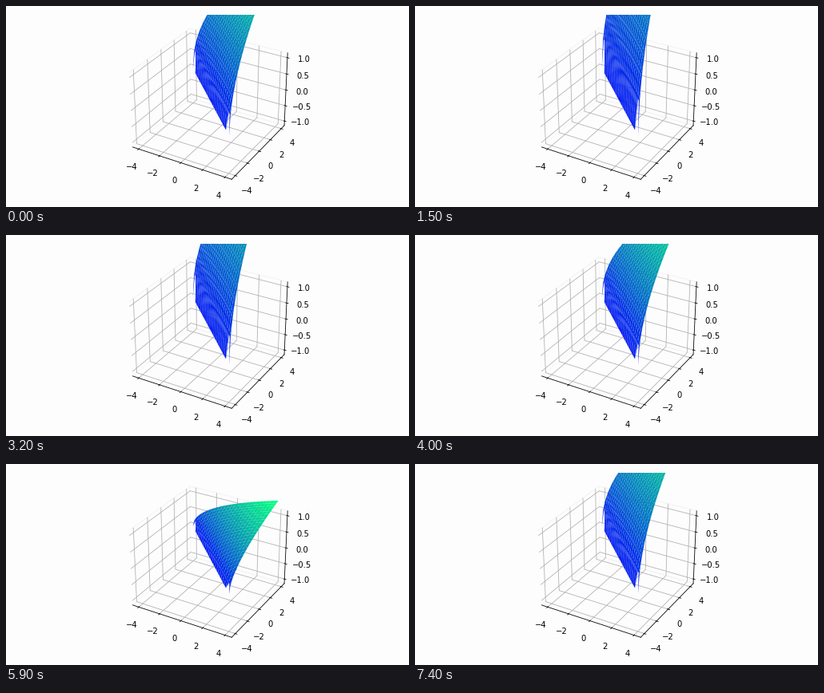
Write a matplotlib script that moves like this. It is 504 px wide and 252 px high and loops after 7500 ms.

```python
import numpy as np
import matplotlib.pyplot as plt
from matplotlib.animation import FuncAnimation

W, H, DPI = 504, 252, 72
FRAMES, INTERVAL = 75, 100
N = 50
BACK = "#fdfdfd"
MARGIN, SIDE = 10.8, 220.4

fig = plt.figure(figsize=(W / DPI, H / DPI), dpi=DPI, facecolor=BACK)
ax = fig.add_axes([0, (H - MARGIN - SIDE) / H, 1, SIDE / H], projection="3d")
ax.patch.set_visible(False)

pad = 25 / 24
ax.set_xlim(-4.4 * pad, 4.4 * pad)
ax.set_ylim(-4.4 * pad, 4.4 * pad)
ax.set_zlim(-1.1 * pad, 1.1 * pad)
ax.set_autoscale_on(False)
ax.tick_params(pad=4.7)
for axis in (ax.xaxis, ax.yaxis, ax.zaxis):
    axis.set_pane_color(BACK)
    axis.pane.set_edgecolor("#f3f3f3")

# Rounding leaves some diagonal sums just below zero, which notches the edge.
line = np.linspace(-4, 4, N + 1)
x, y = np.meshgrid(line, line)
with np.errstate(invalid="ignore"):
    root = np.sqrt(x + y)

surface = None


def draw(i):
    global surface
    if surface is not None:
        surface.remove()
    gain = 1.5 + np.sin(2 * np.pi * i / FRAMES)
    surface = ax.plot_surface(x, y, gain * root, cmap="winter")
    return [surface]


anim = FuncAnimation(fig, draw, frames=FRAMES, interval=INTERVAL,
                     init_func=lambda: [], repeat=True)
plt.show()
```
